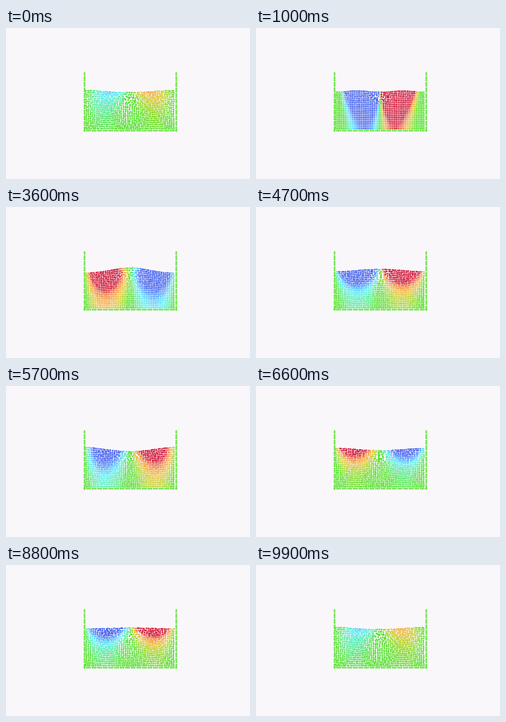
These frames come from a looping animation (306 by 189 pixels, 10000 ms). A matplotlib script:

```python
import numpy as np
import matplotlib.pyplot as plt
from matplotlib.animation import FuncAnimation
from matplotlib.colors import LinearSegmentedColormap

W, H, DPI = 306, 189, 100
FRAMES, STEP = 100, 100                    # loop of 10 s
LEFT, RIGHT, FLOOR, TOP = 98.2, 212.6, 128.3, 56
LEVEL, MID = 79.8, 155.4                   # still surface, tank centre
PERIOD = 4.0
K = 2 * np.pi / (RIGHT - LEFT)
DEPTH = FLOOR - LEVEL

speed_map = LinearSegmentedColormap.from_list("speed", [
    (0.00, "#3355ee"), (0.12, "#3f8cff"), (0.27, "#48f0f6"), (0.40, "#48ea78"),
    (0.46, "#3fe010"), (0.54, "#3fe010"), (0.62, "#98d814"), (0.73, "#f0bc28"),
    (0.88, "#f2702a"), (1.00, "#cd0024")])

# fluid particles at rest
gx, gy = np.meshgrid(np.linspace(100.4, 210.4, 49), np.linspace(126, LEVEL, 21))
x0, y0 = gx.ravel(), gy.ravel()
rng = np.random.default_rng(4)
angle = rng.uniform(0, 2 * np.pi, (2, x0.size))
rate = rng.uniform(0.6, 2.2, (2, x0.size))

# walls and floor
wall_y = np.linspace(TOP, FLOOR, 32)
floor_x = np.linspace(LEFT, RIGHT, 50)
wall = np.vstack([
    np.column_stack([np.full_like(wall_y, LEFT), wall_y]),
    np.column_stack([np.full_like(wall_y, RIGHT), wall_y]),
    np.column_stack([floor_x, np.full_like(floor_x, FLOOR)])])

rise = np.sinh(K * (FLOOR - y0)) / np.sinh(K * DEPTH)
sway0 = np.cosh(K * (FLOOR - y0)) / np.cosh(K * DEPTH)
s0 = K * (x0 - MID)
inner = np.sin(np.pi * (FLOOR - y0) / DEPTH)
churn = np.exp(-((x0 - MID) / 11) ** 2 - ((y0 - 87) / 6) ** 2)


def fluid(t):
    """Positions and normalised horizontal speed of a damped standing wave."""
    phase = 2 * np.pi * t / PERIOD
    amp = 7.2 * np.exp(-t / 6)
    height = amp + 8 * np.exp(-t / 0.6)

    x = x0 - 0.5 * amp * np.cos(phase) * np.sin(s0) * sway0
    crest = height * np.cos(phase) * np.cos(s0)
    crest += K * height ** 2 / 4 * np.cos(2 * phase) * np.cos(2 * s0)
    y = y0 - crest * rise

    # slow circulation bends the lattice, small wobble breaks it up
    x = x + 0.2 * t * inner * np.sin(2 * s0)
    y = y + 0.16 * t * inner * np.cos(2 * s0)
    loose = min(t, 1) * (0.03 * t + 0.2 * rise + 0.8 * churn)
    x = x + loose * np.sin(rate[0] * t + angle[0])
    y = y + 0.6 * loose * np.sin(rate[1] * t + angle[1])
    x = np.clip(x, LEFT + 2, RIGHT - 2)
    y = np.minimum(y, FLOOR - 2)

    # deep water lags the surface, which also drifts outwards
    s = K * (x - MID)
    sway = np.cosh(K * (FLOOR - y)) / np.cosh(K * DEPTH)
    v = amp * np.sin(phase - 0.2 * np.pi * (1 - sway))
    skew = 0.65 * (amp * np.sin(phase) / 6) ** 2 - 0.15
    speed = v * sway * (np.sin(s) + skew * np.sin(2 * s))
    speed += 0.35 * sway ** 3 * (np.sin(s) + 0.4 * np.sin(2 * s))
    return np.column_stack([x, y]), speed


fig = plt.figure(figsize=(W / DPI, H / DPI), dpi=DPI, facecolor="#f9f7fa")
ax = fig.add_axes([0, 0, 1, 1])
ax.set(xlim=(0, W), ylim=(H, 0))
ax.axis("off")


def dots(points, size, **style):
    return ax.scatter(points[:, 0], points[:, 1], s=(size * 72 / DPI) ** 2,
                      linewidths=0, **style)


dots(wall, 2.0, color="#3fe010")
pos, speed = fluid(0)
water = dots(pos, 2.0, c=speed, cmap=speed_map, vmin=-1, vmax=1)


def update(i):
    # the loop opens on the settled state before the release
    pos, speed = fluid((i or FRAMES - 1) * STEP / 1000)
    water.set_offsets(pos)
    water.set_array(speed)
    return (water,)


anim = FuncAnimation(fig, update, frames=FRAMES, interval=STEP,
                     repeat=True, repeat_delay=0, blit=False)
plt.show()
```
